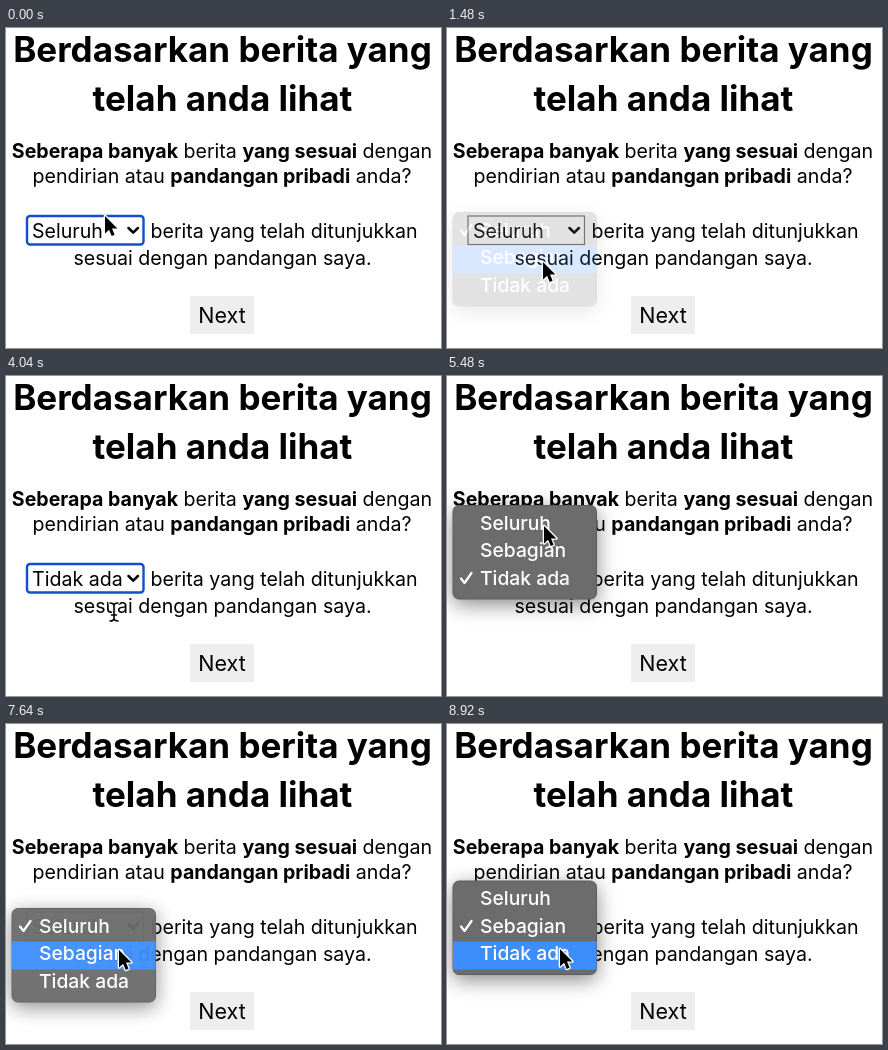
Animation, 435 px wide and 320 px high, one loop 8.96 s. Source, as an HTML page:

```html
<!DOCTYPE html>
<html lang="id">
<head>
<meta charset="utf-8">
<style>
  html, body { margin: 0; width: 100%; height: 100%; overflow: hidden; background: #fff; }
  svg { display: block; width: 435px; height: 320px; }
  text { font: 400 19.6px Inter, sans-serif; }
  .mid { text-anchor: middle; }
  .bold { font-weight: 700; }
  .title { font-weight: 700; font-size: 35px; }
  .next { font-size: 21.5px; }
  #box { fill: #fff; stroke: #1150c8; stroke-width: 2.4px; }
  #box.plain { stroke: #767676; stroke-width: 1.2px; rx: 0; }
  #menu { filter: drop-shadow(0 5px 10px #0007); }
  #menu text { font-weight: 500; font-size: 19.3px; fill: #fff; }
  path { fill: none; stroke-linecap: round; stroke-linejoin: round; }
  #arrow { fill: #000; paint-order: stroke; }
</style>
</head>
<body>
<svg viewBox="0 0 435 320">
  <defs>
    <path id="caret" d="M-4-9Q0-9 0-6Q0-9 4-9M0-6V6M-4 9Q0 9 0 6Q0 9 4 9M-2.5 3H2.5"/>
  </defs>

  <g class="mid">
    <text class="title" x="216.5" y="34">Berdasarkan berita yang</text>
    <text class="title" x="216.5" y="83">telah anda lihat</text>
    <text x="216" y="130"><tspan class="bold">Seberapa banyak</tspan> berita <tspan class="bold">yang sesuai</tspan> dengan</text>
    <text x="216" y="155">pendirian atau <tspan class="bold">pandangan pribadi</tspan> anda?</text>
    <text x="278" y="209.5">berita yang telah ditunjukkan</text>
    <text x="216.5" y="237">sesuai dengan pandangan saya.</text>
    <rect x="184" y="268" width="64" height="38" fill="#eee"/>
    <text class="next" x="216" y="295">Next</text>
  </g>

  <rect id="box" x="21" y="188" width="116.5" height="28.5" rx="3"/>
  <text id="value" x="26" y="209.5"></text>
  <path d="M122.5 200l4.7 4.7 4.7-4.7" stroke="#000" stroke-width="2.5"/>

  <g id="menu">
    <rect x="6" width="143.5" height="93.5" rx="6" fill="#6c6c6c" stroke="#5c5c5c"/>
    <rect id="highlight" x="6" width="143.5" height="28" fill="#3d8efb"/>
    <path id="check" d="M14 18l3.5 4.5 7-10" stroke="#fff" stroke-width="2.2"/>
  </g>

  <path id="arrow" d="M0 0V17.5L4.1 13.7 6.7 20 9.6 18.8 7 12.5H12.4Z" stroke="#fff" stroke-width="2.6"/>
  <g id="beam">
    <use href="#caret" stroke="#fff" stroke-width="3.6"/>
    <use href="#caret" stroke="#000" stroke-width="1.6"/>
  </g>
</svg>
<script>
const LOOP = 8960, ROW = 27.5, FLASH = 90, HOLD = 180, FADE = 125;
const OPEN_LEAD = 900, MOVE_LEAD = 760, MOVE = 380, RETURN_DELAY = 660;
const options = ['Seluruh', 'Sebagian', 'Tidak ada'];
const home = { x: 104, y: 204 };

// Every visit to the menu picks the option after the current one, wrapping round.
const visits = [
  { click: 1200, x: 96, y: 234 },
  { click: 3400, x: 108, y: 236 },
  { click: 5440, x: 97, y: 150 },
  { click: 7455, x: 113, y: 226 },
  { click: 9300, x: 113, y: 225 }
];

const $ = id => document.getElementById(id);
const show = (id, visible) => { $(id).style.display = visible ? '' : 'none'; };
const move = (id, x, y) => $(id).setAttribute('transform', `translate(${x} ${y})`);
const mix = (a, b, p) => a + (b - a) * p;
const ease = p => {
  p = Math.min(1, Math.max(0, p));
  return p * p * (3 - 2 * p);
};

options.forEach((label, row) => {
  const text = document.createElementNS('http://www.w3.org/2000/svg', 'text');
  text.textContent = label;
  text.setAttribute('x', 33);
  text.setAttribute('y', 24.3 + row * ROW);
  $('menu').append(text);
});

// The pointer returns to the select from its last stop, then goes to the next row.
function pointerAt(t, visit, last) {
  const back = ease((t - last.click - RETURN_DELAY) / MOVE);
  const out = ease((t - visit.click + MOVE_LEAD) / MOVE);
  const along = axis => mix(mix(last[axis], home[axis], back), visit[axis], out);
  return [along('x'), along('y')];
}

function draw(t) {
  const index = visits.findIndex(v => t < v.click + HOLD + FADE + RETURN_DELAY / 2);
  const visit = visits[index];
  const last = visits[index - 1] || { click: -RETURN_DELAY, x: 99, y: 188 };
  const [x, y] = pointerAt(t, visit, last);

  const since = t - visit.click;
  const done = since >= HOLD + FADE;
  const open = since >= -OPEN_LEAD && !done;
  const checked = index % options.length;
  const picked = (index + 1) % options.length;

  $('value').textContent = options[done ? picked : checked];
  $('box').classList.toggle('plain', open);

  show('menu', open);
  if (open) {
    const top = 184.5 - checked * ROW;
    const row = since >= 0 ? picked : Math.floor((y - top - 5.5) / ROW);
    const flashing = since >= 0 && since < FLASH;
    move('menu', 0, top);
    move('check', 0, checked * ROW);
    move('highlight', 0, 5.5 + row * ROW);
    $('menu').style.opacity = 1 - Math.max(0, since - HOLD) / FADE;
    show('highlight', !flashing && row >= 0 && row < options.length);
  }

  const overText = !open && (y > 217 || (y > 110 && y < 160));
  show('arrow', !overText);
  show('beam', overText);
  move(overText ? 'beam' : 'arrow', x, y);
}

const start = performance.now();
function tick() {
  draw((performance.now() - start) % LOOP);
  requestAnimationFrame(tick);
}
tick();
</script>
</body>
</html>
```
